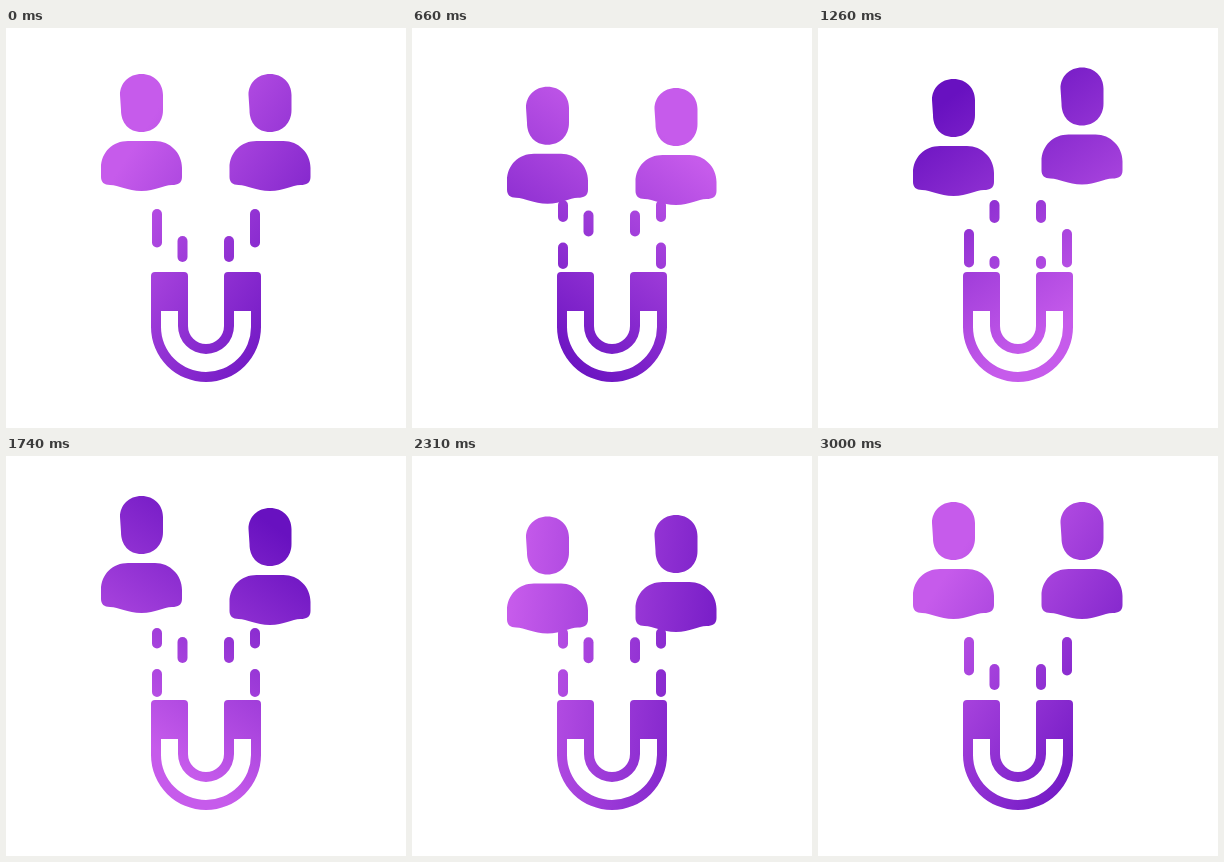
These frames come from a looping animation (400 px wide and 400 px high, 5090 ms). An HTML page with a canvas:

```html
<!DOCTYPE html>
<html lang="en">
<head>
<meta charset="utf-8">
<title>Magnet attracting people</title>
<style>
html, body { margin: 0; width: 100%; height: 100%; overflow: hidden; background: #fff; }
canvas { display: block; width: 400px; height: 400px; }
</style>
</head>
<body>
<canvas id="stage" width="400" height="400"></canvas>
<script>
const ctx = document.getElementById('stage').getContext('2d');
const LOOP = 5090, ACTIVE = 3000, STEP = 30;

// Vertical bob of each person: [time, offset]
const LEFT_BOB = [[0, 0], [900, 15.5], [1650, -7], [2400, 15.5], [3000, 0]];
const RIGHT_BOB = [[0, 0], [540, 15.5], [1330, -7], [2070, 15.5], [3000, 0]];

const PERSON = new Path2D(
  'M135.5 46C148 46 157 55 157 67V82C157 95 148 104 135.5 104C123 104 115 95 115 82L114 67C114 55 123 46 135.5 46Z' +
  'M95 140C95 124 107 113 122 113H149C164 113 176 125 176 140V149C176 155 172 157 166 157' +
  'C157 157 150 163 135.5 163C121 163 113 157 104 157C98 157 95 154 95 149Z');

const MAGNET = new Path2D(
  'M149 244H178Q182 244 182 248V298A18 18 0 0 0 218 298V248Q218 244 222 244H251Q255 244 255 248V299' +
  'A55 55 0 0 1 145 299V248Q145 244 149 244Z' +
  'M155 283V299A45 45 0 0 0 245 299V283H228V298A28 28 0 0 1 172 298V283Z');

const smooth = u => u * u * (3 - 2 * u);
const bezier = (a, b, s) => 3 * (1 - s) * (1 - s) * s * a + 3 * (1 - s) * s * s * b + s * s * s;

function ease(u) {
  let lo = 0, hi = 1;
  for (let i = 0; i < 24; i++) {
    const mid = (lo + hi) / 2;
    if (bezier(0.2, 0.55, mid) < u) lo = mid; else hi = mid;
  }
  return bezier(0.1, 1, (lo + hi) / 2);
}

function track(keys, t) {
  for (let i = 1; i < keys.length; i++) {
    const [t0, v0] = keys[i - 1], [t1, v1] = keys[i];
    if (t <= t1) return v0 + (v1 - v0) * smooth((t - t0) / (t1 - t0));
  }
  return 0;
}

function rotatingGradient(degrees) {
  const a = degrees * Math.PI / 180, c = Math.cos(a), s = Math.sin(a);
  const g = ctx.createLinearGradient(200 - 105 * c, 200 - 105 * s, 200 + 145 * c, 200 + 145 * s);
  g.addColorStop(0, '#c65beb');
  g.addColorStop(1, '#6811c0');
  return g;
}

function addPerson(shape, dx, dy) {
  shape.addPath(PERSON, new DOMMatrix([1, 0, 0, 1, dx, dy]));
}

// A dash sliding down a short track, wrapping from its bottom to its top
function drawDash(x, start, length) {
  const top = 177, span = 59;
  const from = start % span, to = from + length;
  ctx.beginPath();
  ctx.moveTo(x, top + from);
  ctx.lineTo(x, top + Math.min(to, span));
  if (to > span) {
    ctx.moveTo(x, top);
    ctx.lineTo(x, top + to - span);
  }
  ctx.stroke();
}

function draw(t) {
  const e = ease(t / ACTIVE), slide = 59 * 6 * e;
  ctx.fillStyle = '#fff';
  ctx.fillRect(0, 0, 400, 400);
  ctx.fillStyle = ctx.strokeStyle = rotatingGradient(33 + 360 * e);
  ctx.lineWidth = 10;
  ctx.lineCap = 'round';

  const people = new Path2D();
  addPerson(people, 0, track(LEFT_BOB, t));
  addPerson(people, 128.5, track(RIGHT_BOB, t));
  ctx.fill(people);

  for (const x of [151, 249]) drawDash(x, 9 + slide, 28.5);
  for (const x of [176.5, 223]) drawDash(x, 36 + slide, 16);
  ctx.fill(MAGNET, 'evenodd');
}

const origin = performance.now();
function tick() {
  const t = (performance.now() - origin) % LOOP;
  draw(Math.min(ACTIVE, Math.floor(t / STEP) * STEP));
  requestAnimationFrame(tick);
}
tick();
</script>
</body>
</html>
```
